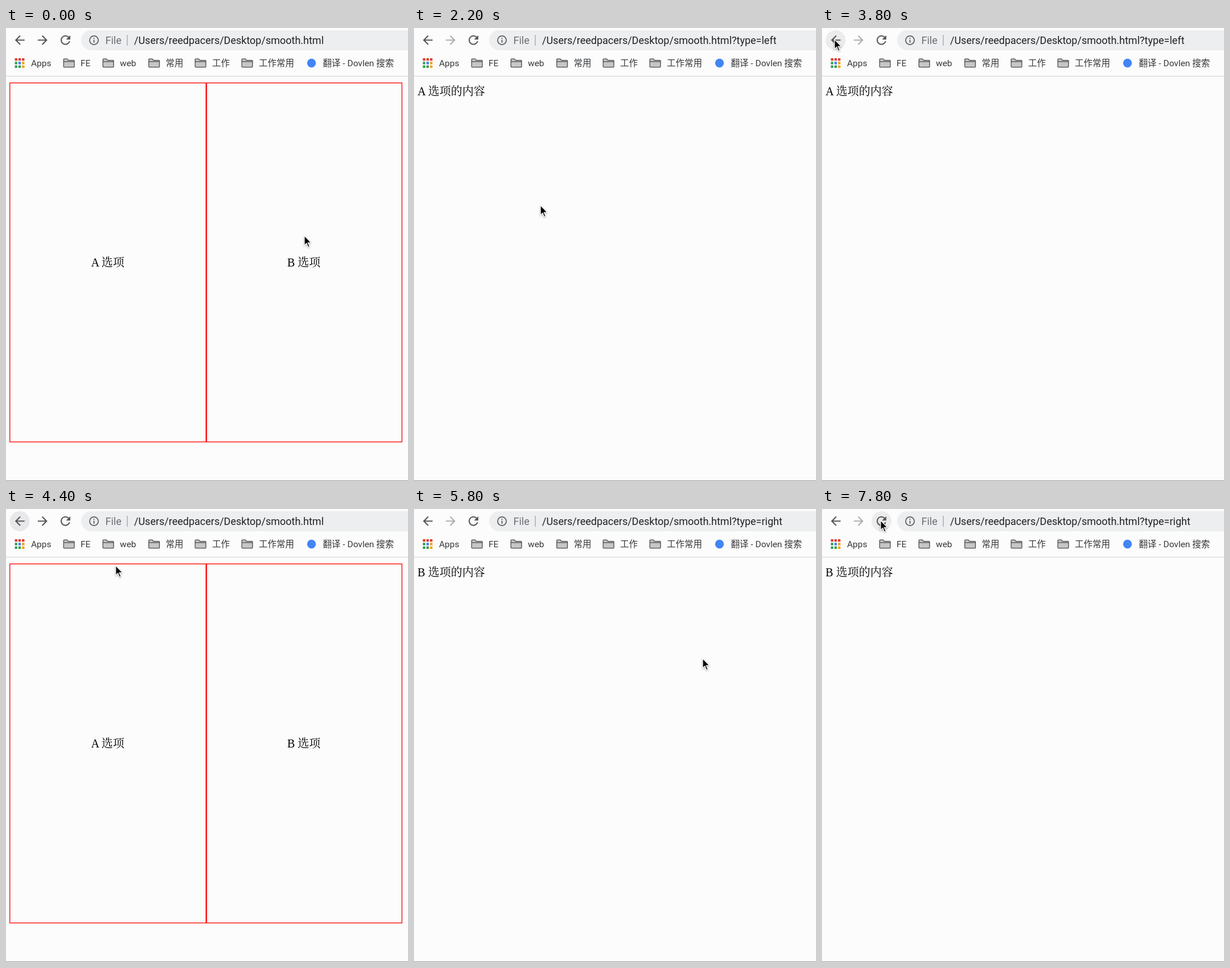
Recreate the animation shown at these times as an HTML page. Size 706x794 px, loop 8 s.

```html
<!DOCTYPE html>
<html lang="zh">
<head>
<meta charset="utf-8">
<title>Smooth</title>
<style>
  html, body { margin: 0; width: 100%; height: 100%; overflow: hidden; background: #fcfcfc; }
  svg { display: block; width: 706px; height: 794px; }
  text { white-space: pre; }
  .ui { font: 15.5px Roboto, "Noto Sans CJK SC", "Noto Sans CJK", sans-serif; fill: #35373a; }
  .url { font-size: 18px; fill: #202124; }
  .page { font: 20px "Liberation Serif", "Noto Serif CJK SC", "Noto Sans CJK SC", "Noto Sans CJK", serif; }
  .icon { fill: #54575b; }
  .box { fill: none; stroke: #fb0d0d; stroke-width: 1.4; }
  .folder { fill: #c6c6c6; stroke: #4a4a4c; stroke-width: 1.3; stroke-linejoin: round; }
  .hover { fill: #ececed; visibility: hidden; }
  #cursor { filter: drop-shadow(0 1.5px 1.5px rgba(0, 0, 0, .35)); }
</style>
</head>
<body>
<svg viewBox="0 0 706 794">
  <defs>
    <path id="arrow" d="M20 11H7.83l5.59-5.59L12 4l-8 8 8 8 1.41-1.41L7.83 13H20v-2z"/>
    <path id="folder" class="folder" d="M.7 14V1.9Q.7.7 1.9.7H7l2 2.4h9.300q1.200 0 1.200 1.200V14q0 1.200-1.200 1.200H1.900Q.7 15.200.7 14zM.7 5.300H19.500"/>
  </defs>

  <g id="hovers"></g>

  <!-- toolbar -->
  <use href="#arrow" class="icon" transform="translate(11.500 8.500) scale(1.06)"/>
  <use href="#arrow" class="icon" id="forward" transform="translate(77 8.500) scale(-1.06 1.06)"/>
  <path class="icon" transform="translate(91.700 8.500) scale(1.06)" d="M17.650 6.350C16.200 4.900 14.210 4 12 4c-4.420 0-7.990 3.580-7.990 8s3.570 8 7.990 8c3.730 0 6.840-2.550 7.730-6h-2.080c-.82 2.330-3.040 4-5.650 4-3.310 0-6-2.690-6-6s2.690-6 6-6c1.660 0 3.140.69 4.220 1.780L13 11h7V4l-2.350 2.350z"/>
  <rect x="132" y="4" width="620" height="35" rx="17.500" fill="#eceef0"/>
  <circle cx="154.500" cy="21.500" r="7.600" fill="none" stroke="#5a5d61" stroke-width="1.700"/>
  <path d="M154.500 20.500v5.200M154.500 17.200v1.900" stroke="#5a5d61" stroke-width="1.800"/>
  <text class="ui" x="174.500" y="27.700" style="font-size:18px;fill:#6c7074">File</text>
  <path d="M213 12v19" stroke="#a0a3a7" stroke-width="1.300"/>
  <text class="ui url" id="url" x="225" y="27.700"></text>

  <!-- bookmarks -->
  <g id="marks"></g>
  <circle cx="536.500" cy="61.500" r="7.700" fill="#4285f4"/>
  <path d="M0 84.500H706" stroke="#d2d2d6"/>
  <path d="M0 793.500H706" stroke="#96969f"/>

  <!-- page -->
  <g class="page">
    <g id="choice">
      <rect class="box" x="6.700" y="96.300" width="344.500" height="629.200"/>
      <rect class="box" x="352.400" y="96.300" width="343" height="629.200"/>
      <text x="149.500" y="417.500">A 选项</text>
      <text x="494" y="417.500">B 选项</text>
    </g>
    <text id="content" x="6.300" y="117.500"></text>
  </g>

  <path id="cursor" fill="#000" stroke="#fff" stroke-width="1.200"
    d="M0 0V17L3.800 13.400 6.700 20.200 9.200 19.100 6.300 12.400 11.600 12.100Z"/>
</svg>

<script>
const $ = id => document.getElementById(id);
const LOOP = 8000, STEP = 100;

function add(parent, tag, attrs, text = '') {
  const el = document.createElementNS('http://www.w3.org/2000/svg', tag);
  for (const key in attrs) el.setAttribute(key, attrs[key]);
  el.textContent = text;
  return parent.appendChild(el);
}

// Hoverable pills: hit box plus the element that lights up.
const pill = (x, y, w, h) => ({
  x, y, w, h,
  el: add($('hovers'), 'rect', { class: 'hover', x, y, width: w, height: h, rx: h / 2 })
});
const back = pill(6.5, 4, 35, 35);
const reload = pill(87, 4, 35, 35);
const pills = [back, reload];

// Icon x, label, pill width
const folders = [[100.500, 'FE', 64], [169.500, 'web', 75], [250, '常用', 77], [331.500, '工作', 77], [413.500, '工作常用', 108]];
for (const [x, label, w] of folders) {
  pills.push(pill(x - 7.500, 44, w, 34.500));
  add($('marks'), 'use', { href: '#folder', x, y: 53.500 });
  add($('marks'), 'text', { class: 'ui', x: x + 30.500, y: 67 }, label);
}
add($('marks'), 'text', { class: 'ui', x: 44, y: 67 }, 'Apps');
add($('marks'), 'text', { class: 'ui', x: 556.500, y: 67 }, '翻译 - Dovlen 搜索');

const [R, G, B, Y] = ['#e33b2e', '#2f9e4f', '#3f7fe8', '#f0a012'];
[R, R, R, G, B, Y, G, G, Y].forEach((fill, i) => add($('marks'), 'rect', {
  x: 15.500 + i % 3 * 6.300, y: 53 + Math.floor(i / 3) * 6.300, width: 4.300, height: 4.300, fill
}));

// Time, x, y, vertical bend of the way there
const path = [
  [0, 524, 364, 0], [1000, 253, 378, 0], [1900, 253, 378, 0],
  [2900, 110, 67, 0], [3000, 110, 67, 0], [3600, 22, 20, 0], [4000, 22, 20, 0],
  [5000, 507, 262, -6.500], [5800, 507, 262, 0],
  [6200, 122, 3, 0], [6400, 103, 20, 0], [LOOP, 103, 20, 0]
];

function cursorAt(t) {
  const i = path.findIndex(p => p[0] > t);
  const [t0, x0, y0] = path[i - 1], [t1, x1, y1, bend] = path[i];
  const u = (t - t0) / (t1 - t0), s = u * u * (3 - 2 * u);
  return [x0 + (x1 - x0) * s, y0 + (y1 - y0) * s + bend * 4 * s * (1 - s)];
}

// Start time, query type, content
const pages = [[0, '', ''], [1500, 'left', 'A'], [4000, '', ''], [5200, 'right', 'B']];

function draw(t) {
  const [, type, letter] = pages.filter(p => p[0] <= t).pop();
  $('choice').style.display = type ? 'none' : '';
  $('content').textContent = letter && letter + ' 选项的内容';
  $('url').textContent = '/Users/reedpacers/Desktop/smooth.html' + (type && '?type=' + type);
  $('forward').style.fill = type ? '#acaeb1' : '';

  const [x, y] = cursorAt(t);
  $('cursor').setAttribute('transform', `translate(${x} ${y})`);

  // A pressed button stays lit for a while after the click.
  const pressed = t >= 3900 && t < 4600 ? back : t >= 7000 && t < 7200 ? reload : null;
  for (const p of pills) {
    const over = x >= p.x && x <= p.x + p.w && y >= p.y && y <= p.y + p.h;
    p.el.style.visibility = over || p === pressed ? 'visible' : 'hidden';
    p.el.style.fill = p === pressed ? '#e8e8ea' : '';
  }
}

const start = performance.now();
function tick() {
  const t = (performance.now() - start) % LOOP;
  draw(Math.floor(t / STEP) * STEP);
  requestAnimationFrame(tick);
}
tick();
</script>
</body>
</html>
```
